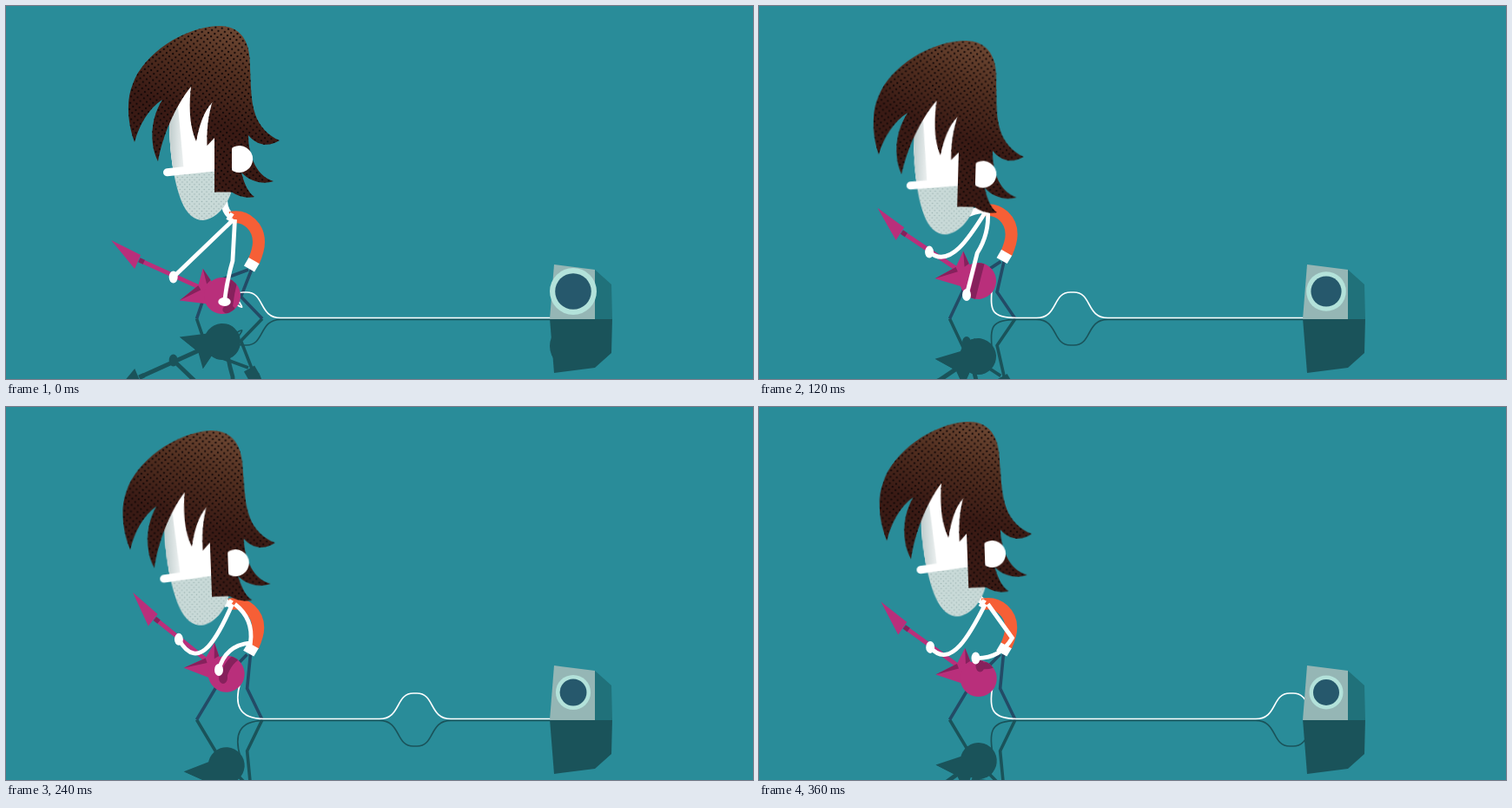
An HTML page for the animation above (0.4 s loop, 860 px wide and 430 px high).

```html
<!DOCTYPE html>
<html lang="en">
<head>
<meta charset="utf-8">
<title>Guitar player</title>
<style>
html, body { margin: 0; width: 100%; height: 100%; overflow: hidden; background: #298c99; }
svg { display: block; width: 860px; height: 430px; }
</style>
</head>
<body>
<svg viewBox="0 0 860 430" fill="none">
  <defs>
    <linearGradient id="hairTone" gradientUnits="userSpaceOnUse" x1="264" y1="26" x2="224" y2="128">
      <stop offset="0" stop-color="#6e4833"/>
      <stop offset=".45" stop-color="#522f20"/>
      <stop offset="1" stop-color="#3a1a14"/>
    </linearGradient>
    <linearGradient id="cheek" gradientUnits="userSpaceOnUse" x1="187" y1="0" x2="206" y2="0">
      <stop offset="0" stop-color="#bccaca"/>
      <stop offset="1" stop-color="#f1f4f4"/>
    </linearGradient>
    <pattern id="hairDots" width="7.4" height="7.4" patternUnits="userSpaceOnUse" patternTransform="rotate(8)">
      <circle cx="1.9" cy="1.9" r="1.15" fill="#120808"/>
      <circle cx="5.6" cy="5.6" r="1.15" fill="#120808"/>
    </pattern>
    <pattern id="skinDots" width="5.6" height="5.6" patternUnits="userSpaceOnUse">
      <circle cx="1.4" cy="1.4" r=".75" fill="#94adac"/>
      <circle cx="4.2" cy="4.2" r=".75" fill="#94adac"/>
    </pattern>
    <path id="face" d="M188 118C187 160 192 200 202 225C208 240 217 247 227 247C240 246 255 232 260 212L246 110L213 88Z"/>
    <path id="hair" d="M148 157C140 135 138 108 146 90C158 55 205 24 245 23C268 23 279 38 280.500 60C282 85 281 108 287 125C292 140 303 150 315 155C302 163 289 161 279 149C279 175 290 197 308 202C296 206 282 203 271 192C275 208 280 216 286 220C276 222 267 219 260 214.500L240 214.500V152L231.500 161C231 142 233 126 237.500 111C227 122 222 140 219 156C212 140 210 120 213 93C195 115 180 150 175 179C165 160 166 130 180 108C164 118 153 138 148 157Z"/>
    <clipPath id="upper"><path d="M170 80H270V187L170 196Z"/></clipPath>
    <clipPath id="faceClip"><use href="#face"/></clipPath>
    <clipPath id="bodyClip"><circle id="bodyHole" r="21"/></clipPath>
    <filter id="dark" filterUnits="userSpaceOnUse" x="0" y="200" width="860" height="170" color-interpolation-filters="sRGB">
      <feFlood flood-color="#1a535a"/>
      <feComposite in2="SourceAlpha" operator="in"/>
    </filter>
  </defs>

  <rect width="860" height="430" fill="#298c99"/>
  <use href="#scene" transform="matrix(1 0 0 -1 0 721)" filter="url(#dark)"/>

  <path id="neck" stroke="#fff" stroke-width="8"/>
  <g id="scene">
    <path id="legs" stroke="#234b66" stroke-width="3.600"/>
    <g id="torso">
      <path d="M258 244C278 240 291 256 291 272C291 281 288 288 285 295" stroke="#f65f36" stroke-width="14"/>
      <path d="M285.500 293.500L280 303" stroke="#fff" stroke-width="14"/>
      <path d="M255.500 247L260.500 239" stroke="#fff" stroke-width="5"/>
    </g>
    <path id="cable" stroke="#fff" stroke-width="1.700"/>
    <g id="guitar">
      <path d="M-103 6L-26 3" stroke="#b92f7b" stroke-width="5"/>
      <path d="M-104 6L-98 5.800" stroke="#86215c" stroke-width="5.500"/>
      <path d="M-143 0L-105 0L-104 17.500Z" fill="#b92f7b"/>
      <path d="M-41.500 27L-30 2L-34 -18L-20 -10L0 0L-11 16Z" fill="#b92f7b"/>
      <path d="M-41.500 27L-30 2L-25 5ZM-34 -18L-20 -10L-22 -4Z" fill="#86215c"/>
      <circle r="21" fill="#b92f7b"/>
    </g>
    <g clip-path="url(#bodyClip)">
      <g transform="translate(5 9)">
        <path id="shade" stroke="#86215c" stroke-width="8"/>
        <ellipse id="shadeHand" fill="#86215c"/>
      </g>
    </g>
    <g stroke="#fff" stroke-width="4.800">
      <path id="fretArm"/>
      <path id="strumArm"/>
    </g>
    <ellipse id="fretHand" rx="5" ry="7" fill="#fff"/>
    <ellipse id="strumHand" fill="#fff"/>
    <path d="M678 304L697 321L698 361H678Z" fill="#20717a"/>
    <path d="M631 298L678 304V361H626Z" fill="#95b6b5"/>
    <circle id="ring" cx="653" cy="329" fill="#b3e2da"/>
    <circle id="cone" cx="653" cy="329" fill="#26586c"/>
  </g>

  <g id="head">
    <use href="#face" fill="#c9dad8"/>
    <use href="#face" fill="url(#skinDots)"/>
    <g clip-path="url(#upper)">
      <use href="#face" fill="#fff"/>
      <path d="M180 105H197L205 192H180Z" fill="url(#cheek)" clip-path="url(#faceClip)"/>
    </g>
    <path d="M185.500 191.800L245 185.500" stroke="#fff" stroke-width="9" stroke-linecap="round"/>
    <use href="#hair" fill="url(#hairTone)"/>
    <use href="#hair" fill="url(#hairDots)"/>
    <path d="M260 165Q260 163 262 162.500A15.500 15.500 0 1 1 262 190.500Q260 190 260 188Z" fill="#fff"/>
  </g>
</svg>
<script>
// The picture holds for STEP ms; a strum takes ten steps: rise for RISE, then drop.
const STEP = 40, STEPS = 10, RISE = 8;
const FLOOR = 359.5, BONE = 48;

const set = (id, attrs) => {
  const el = document.getElementById(id);
  for (const k in attrs) el.setAttribute(k, attrs[k]);
};
const mix = (a, b, k) => a + (b - a) * k;
const easeOut = k => 1 - (1 - k) ** 2;
const middle = (a, b) => [mix(a[0], b[0], .5), mix(a[1], b[1], .5)];

// Point turned by deg around the origin, then moved to x, y.
function place(px, py, deg, x, y) {
  const a = deg * Math.PI / 180, c = Math.cos(a), s = Math.sin(a);
  return [x + px * c - py * s, y + px * s + py * c];
}

// Smooth closed curve through evenly spaced values.
function sway(v, n) {
  const u = n / STEPS * v.length, i = Math.floor(u), t = u - i;
  const [a, b, c, d] = [-1, 0, 1, 2].map(j => v[(i + j + v.length) % v.length]);
  return b + t / 2 * (c - a + t * (2 * a - 5 * b + 4 * c - d + t * (3 * (b - c) + d - a)));
}

// Straight runs between key points [step, ...values].
function along(points, n) {
  const i = points.findIndex(p => p[0] > n);
  const a = points[i - 1], b = points[i];
  return a.slice(1).map((v, j) => mix(v, b[j + 1], (n - a[0]) / (b[0] - a[0])));
}

// Midpoint of a-b pushed sideways by amount.
function bow(a, b, amount) {
  const [x, y] = middle(a, b), dx = b[0] - a[0], dy = b[1] - a[1];
  const k = amount / Math.hypot(dx, dy);
  return [x + dy * k, y - dx * k];
}

function drawHead(n, lift) {
  const x = sway([0, -9.5, -8, -6, -4.8], n);
  const y = sway([0, 13, 16.7, 4.8, -7.8], n);
  const turn = sway([0, 3.3, -.7, -2.1, -3.5], n);
  const [nx, ny] = place(25, 95, turn, 226 + x, 130 + y);
  set('head', { transform: `translate(${x} ${y}) rotate(${turn} 226 130)` });
  set('neck', { d: `M${nx} ${ny}Q${nx + 1} ${mix(ny, 244 + lift, .7)} 261 ${244 + lift}` });
}

function drawBody(k, lift) {
  set('torso', { transform: `translate(${-k} ${300 + lift}) scale(1 ${1 - .05 * k}) translate(0 -300)` });
  set('legs', {
    d: `M${279 - 2 * k} ${304 + lift}L${233 + 14 * k} ${321 - k}L219.500 360.500` +
       `M${283 - 2 * k} ${303 + lift}L${270.5 + 9.5 * k} ${335 - 14 * k}L295 360.500`
  });
}

function drawFretArm(shoulder, hand, slack) {
  const [sx, sy] = shoulder, [hx, hy] = hand;
  const knot = (t, dx, dy) => `${mix(sx, hx, t) + dx * slack} ${mix(sy, hy, t) + dy * slack} `;
  set('fretArm', { d: `M${shoulder}C${knot(1 / 3, 6, 22)}${knot(2 / 3, 3, 59)}${hand}` });
  set('fretHand', { cx: hx, cy: hy });
}

// Two equal bones; the upper one bulges on the way up, the forearm trails the hand.
function drawStrumArm(n, shoulder) {
  const hand = along([[0, 251.5, 341], [2, 237, 343], [RISE, 249, 283], [9, 249.5, 289.5], [10, 251.5, 341]], n);
  const half = Math.hypot(hand[0] - shoulder[0], hand[1] - shoulder[1]) / 2;
  const bend = Math.sqrt(Math.max(0, BONE ** 2 - half ** 2));
  const elbow = bow(shoulder, hand, bend);
  const bulge = n > 2 && n < RISE ? 16 * Math.sin(Math.PI * (n - 2) / (RISE - 2)) : 0;
  const upper = bow(shoulder, elbow, bulge);
  const fore = bow(elbow, hand, n > RISE ? bend * .4 : -bend * .6);
  const arm = { d: `M${shoulder}Q${upper} ${elbow}Q${fore} ${hand}` };
  const palm = { cx: hand[0], cy: hand[1], rx: n ? 5 : 7.2, ry: n ? 7 : 5 };
  set('strumArm', arm);
  set('shade', arm);
  set('strumHand', palm);
  set('shadeHand', palm);
}

// Cable hangs from the guitar; one bump runs along it to the amplifier.
function drawCable(n, px, py, swing) {
  const [c] = along([[0, 275], [4, 389], [6, 471], [RISE, 577], [9, 613], [10, 650]], n);
  const top = 330, base = c - 41, foot = Math.min(297, base);
  const crest = `${c - 23} ${top} ${c - 2} ${top}`;
  const start = base < 280
    ? `C${px + 20} ${py + 12} ${crest}`
    : `C${px + 8 - 16 * swing} ${py + 24} ${foot - 30} ${FLOOR} ${foot} ${FLOOR}H${base}C${c - 16} ${FLOOR} ${crest}`;
  set('cable', { d: `M${px} ${py}${start}H${c + 2}C${c + 23} ${top} ${c + 16} ${FLOOR} ${c + 41} ${FLOOR}H628` });
}

function draw(n) {
  const drop = 1 - ((n - RISE) / (STEPS - RISE)) ** 2;
  const k = n > RISE ? drop : n / RISE;
  const swing = n > RISE ? drop : easeOut(k);
  const lift = -25 * k;

  drawHead(n, lift);
  drawBody(k, lift);

  const x = 249 + 5 * swing, y = 334 - 28 * swing, tilt = 26.6 + 15.5 * swing;
  set('guitar', { transform: `translate(${x} ${y}) rotate(${tilt})` });
  set('bodyHole', { cx: x, cy: y });
  drawCable(n, x + 16, y + 10, swing);

  drawFretArm([262 - 2 * k, 246 + lift], place(-60 - 8 * swing, 6, tilt, x, y), swing);
  drawStrumArm(n, [263.5, 246 + lift]);

  const r = 27 - 7.5 * Math.sin(Math.min(1, n / RISE) * Math.PI / 2);
  set('ring', { r });
  set('cone', { r: r * .77 });
}

const start = performance.now();
function tick() {
  draw(Math.floor((performance.now() - start) / STEP) % STEPS);
  requestAnimationFrame(tick);
}
tick();
</script>
</body>
</html>
```
